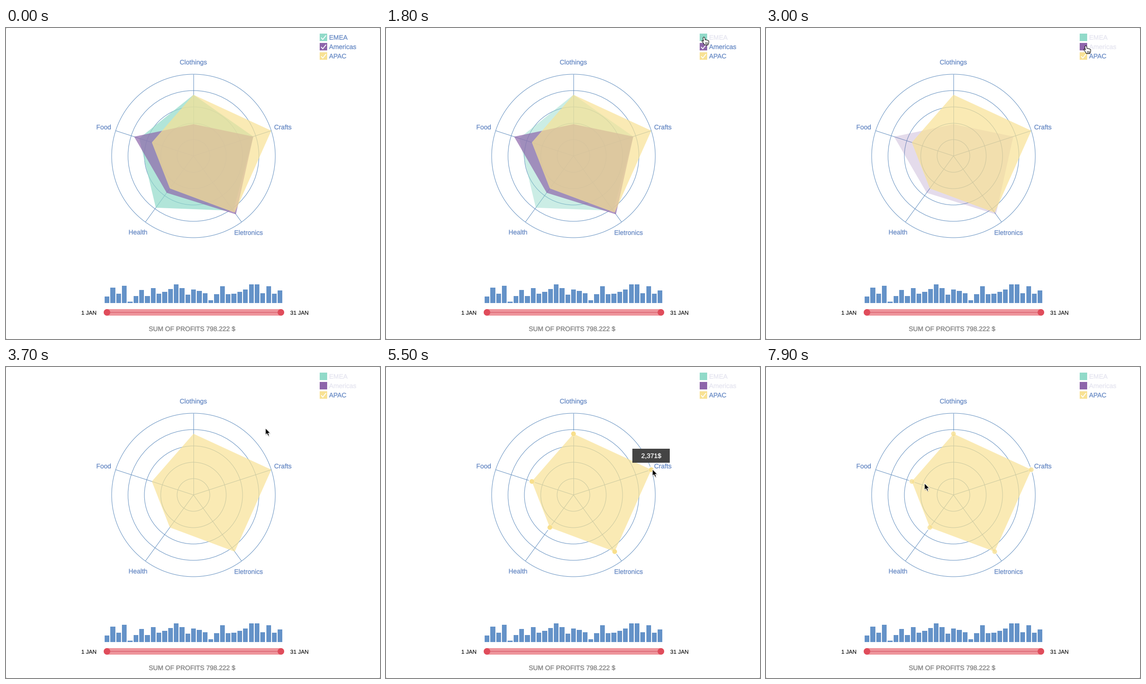
Recreate the animation shown at these times as a matplotlib script. Size 800 px wide and 666 px high, loop 8000 ms.

```python
import numpy as np
import matplotlib.pyplot as plt
from matplotlib.animation import FuncAnimation
from matplotlib.patches import Circle, Polygon, Rectangle
from matplotlib.patheffects import Stroke

W, H, DPI = 800, 666, 100
PX = 72 / DPI                       # one pixel in points
FRAMES, STEP = 80, 100
CX, CY, R = 401, 274, 175
GRID, LABEL, OFF = "#6490c0", "#6a8cc6", "#e6e6f1"
BLUE, RED = "#6492c8", "#e04c5b"

plt.rcParams["font.family"] = "Liberation Sans"
plt.rcParams["toolbar"] = "None"

fig = plt.figure(figsize=(W / DPI, H / DPI), dpi=DPI, facecolor="white")
ax = fig.add_axes([0, 0, 1, 1])
ax.set_xlim(0, W)
ax.set_ylim(H, 0)
ax.axis("off")


def polar(i, r):
    a = 2 * np.pi * i / 5
    return CX + r * np.sin(a), CY - r * np.cos(a)


def label(x, y, s, size=14, color=LABEL, ha="left", bold=0.35, z=6):
    return ax.text(x, y, s, fontsize=size * PX, color=color, ha=ha,
                   va="baseline", zorder=z,
                   path_effects=[Stroke(linewidth=bold * PX)])


def rect(x, y, w, h, color, z=2):
    return ax.add_patch(Rectangle((x, y), w, h, fc=color, lw=0, zorder=z))


def line(xs, ys, color, width=1, z=1, cap="butt"):
    return ax.plot(xs, ys, color=color, lw=width * PX, zorder=z,
                   solid_capstyle=cap, solid_joinstyle="miter")[0]


def ramp(t, start, length):
    return float(np.clip((t - start) / length, 0, 1))


# window corners
for x in (0, W - 1):
    for y in (0, H - 1):
        rect(x, y, 1, 1, "#8c8c8c")

# radar grid
for k in range(1, 6):
    ax.add_patch(Circle((CX, CY), R * k / 5, fill=False, ec=GRID,
                        lw=PX, zorder=1))
for i in range(5):
    x, y = polar(i, R)
    line([CX, x], [CY, y], GRID)

label(CX, 78, "Clothings", ha="center")
label(573.5, 217, "Crafts")
label(488, 443, "Eletronics")
label(262, 442, "Health")
label(193, 217, "Food")

# series: name, colour, radii, time of the click that hides it
SERIES = [
    ("EMEA", "#91dac9", (131, 134.5, 145, 137, 122), 1700),
    ("Americas", "#8e66ab", (68, 134.5, 154.5, 97.5, 133.5), 2800),
    ("APAC", "#f8e294", (131, 175, 150, 86, 93.6), None),
]
areas, names, ticks = [], [], []
for k, (name, color, radii, _) in enumerate(SERIES):
    pts = [polar(i, r) for i, r in enumerate(radii)]
    areas.append(ax.add_patch(Polygon(pts, fc=color, lw=0, alpha=0.7,
                                      zorder=3 + 0.1 * k)))
    y = 12 + 20 * k
    rect(671, y, 16, 16, color)
    ticks.append(line([674, 677.6, 684.6], [y + 8.5, y + 12.5, y + 3.8],
                      "white", 1.8, 4))
    names.append(label(691, y + 13, name))

# hover dots of the last series, each with a soft gap in the grid behind
dots, halos = [], []
for x, y in pts:
    halos.append(ax.add_patch(Circle((x, y), 7, fc="white", lw=0, zorder=2)))
    dots.append(ax.add_patch(Circle((x, y), 5, fc="#f8df8c", lw=0, zorder=4)))

# daily bars
HEIGHTS = [14, 33, 20, 37, 3.5, 15, 28, 15, 32, 20, 24, 30, 40, 32, 18, 29,
           26, 21, 6.5, 19, 36, 19, 20, 24.5, 29, 40, 40, 21.5, 36, 20.5, 27]
for i, h in enumerate(HEIGHTS):
    rect(211 + 12.34 * i, 589 - h, 10.2, h, BLUE)

# range slider
line([216, 588], [609, 609], "#ee959c", 14, 2, "round")
line([216, 588], [609, 609], "#d9626f", 1.5, 3)
for x in (216, 588):
    ax.add_patch(Circle((x, 609), 7, fc=RED, lw=0, zorder=4))
label(161, 614, "1 JAN", 12, "black", bold=0.1)
label(608, 614, "31 JAN", 12, "black", bold=0.1)
label(398, 649, "SUM OF PROFITS 798.222 $", color="#808080", ha="center")


# tooltips: point index, text, fade-in start, fade-out start
class Tip:
    def __init__(self, i, text, start, end):
        x, y = pts[i]
        self.start, self.end = start, end
        self.box = rect(x - 40, y - 45, 80, 30, "#444444", 8)
        self.text = label(x, y - 25, text, color="white", ha="center", z=9)

    def update(self, t):
        a = ramp(t, self.start, 200) * (1 - ramp(t, self.end, 200))
        self.box.set_alpha(a)
        self.text.set_alpha(a)


tips = [Tip(1, "2,371$", 4650, 5950), Tip(0, "1,775$", 6880, 7350)]

# pointers, relative to the hot spot
ARROW = np.array([(0, 0), (0, 14.4), (3.3, 11.4), (5.5, 16.6), (8, 15.6),
                  (5.9, 10.6), (10.2, 10.4)])
HAND = np.array([(-2, 1), (0, -0.8), (2, 1), (2.5, 5.5), (4.5, 5), (5.5, 6),
                 (7.5, 5.8), (8.5, 7), (10, 7), (10.6, 8.5), (10.2, 12),
                 (8.5, 16), (1, 16), (-0.5, 13), (-4, 8.5), (-4.2, 6.8),
                 (-2.5, 6.6), (-0.8, 8.6)])


def pointer(shape, face, edge, z, alpha=1):
    return ax.add_patch(Polygon(shape, fc=face, ec=edge, lw=PX, zorder=z,
                                alpha=alpha, joinstyle="round"))


shadow = pointer(ARROW, "black", "none", 10, 0.25)
arrow = pointer(ARROW, "black", "white", 11)
hand = pointer(HAND, "white", "black", 11)
creases = [line([0, 0], [0, 0], "black", 0.8, 12) for _ in range(3)]

# pointer stops: time, x, y
PATH = np.array([
    (400, 700, 150), (800, 681.5, 78), (1000, 681.5, 78), (1400, 680, 20),
    (1900, 680, 20), (2300, 684, 38.5), (3000, 684, 38.5), (3600, 555, 131),
    (4000, 555, 131), (4600, 570, 219), (5900, 570, 219), (6700, 404, 139),
    (7200, 404, 139), (7900, 339, 249),
])


def pointer_at(t):
    k = int(np.clip(np.searchsorted(PATH[:, 0], t, "right") - 1,
                    0, len(PATH) - 2))
    u = ramp(t, PATH[k, 0], PATH[k + 1, 0] - PATH[k, 0])
    u = u * u * (3 - 2 * u)
    return PATH[k, 1:] * (1 - u) + PATH[k + 1, 1:] * u


def draw(n):
    t = n * STEP
    for (_, _, _, click), area, name, tick in zip(SERIES, areas, names, ticks):
        if click is None:
            continue
        area.set_alpha(0.7 * (1 - ramp(t, click, 300)))
        name.set_color(OFF if t >= click else LABEL)
        tick.set_visible(t < click)

    shown = ramp(t, 4400, 200) * (1 - 0.25 * ramp(t, 5950, 200))
    for dot, halo in zip(dots, halos):
        dot.set_alpha(shown)
        halo.set_alpha(0.9 * shown)
    for tip in tips:
        tip.update(t)

    pos = pointer_at(t)
    on = t >= PATH[0, 0]
    link = 668 < pos[0] < 750 and pos[1] < 70
    arrow.set_xy(ARROW + pos)
    hand.set_xy(HAND + pos)
    shadow.set_xy((HAND if link else ARROW) + pos + (0.8, 1.8))
    arrow.set_visible(on and not link)
    hand.set_visible(on and link)
    shadow.set_visible(on)
    for k, c in enumerate(creases):
        x = pos[0] + 2.6 + 2.4 * k
        c.set_data([x, x], [pos[1] + 10, pos[1] + 14])
        c.set_visible(on and link)
    return []


anim = FuncAnimation(fig, draw, frames=FRAMES, interval=STEP, repeat=True,
                     repeat_delay=0, blit=False)
plt.show()
```
